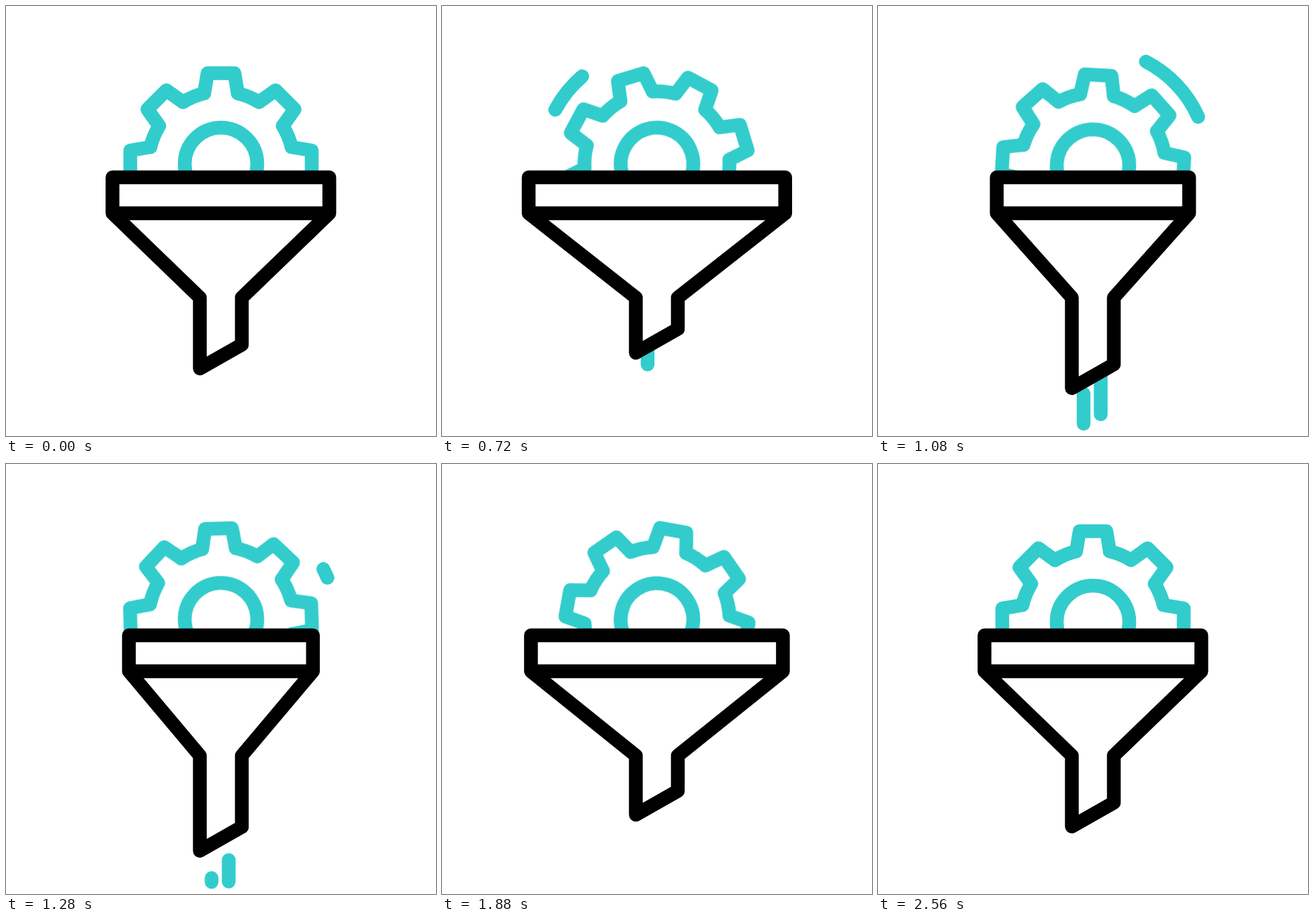
An HTML page without scripts that plays this animation: 640x640 px, repeating every 2840 ms.

```html
<!DOCTYPE html>
<html lang="en">
<head>
<meta charset="utf-8">
<title>Funnel and gear</title>
<style>
  @property --head { syntax: "<length>"; inherits: false; initial-value: 0px; }
  @property --tail { syntax: "<length>"; inherits: false; initial-value: 0px; }

  :root { --loop: 2840ms; --ease: cubic-bezier(.333, 0, .667, 1); }
  html, body { margin: 0; width: 100%; height: 100%; overflow: hidden; background: #fff; }
  svg { display: block; width: 100%; height: 100%; }

  .line {
    fill: none;
    stroke: #3cc;
    stroke-width: 20.5;
    stroke-linecap: round;
    stroke-linejoin: round;
  }
  .funnel { fill: #fff; stroke: #000; animation: squash var(--loop) var(--ease) infinite; }
  .bob { animation: bob var(--loop) var(--ease) infinite; }
  .spin { animation: spin var(--loop) var(--ease) infinite; }

  /* A stroke whose two ends travel along its path independently */
  .trail {
    stroke-dasharray: max(0px, var(--head) - var(--tail)) 300px;
    stroke-dashoffset: calc(var(--tail) * -1);
    opacity: 0;
    animation: head var(--loop) linear infinite, tail var(--loop) linear infinite;
  }
  .swoosh { animation-delay: 0ms, -50ms; }
  .drop-left { animation-delay: -40ms; }
  .drop-right { animation-delay: 120ms; }

  @keyframes squash {
    0%, 90.14%, 100% { d: path("M158.5 255H481.2V308.5H158.5ZM158.5 308.5L288.5 434V539.5L351 504V434L481.2 308.5"); }
    19.72% { d: path("M119.3 255H520.5V308.5H119.3ZM119.3 308.5L288.5 434V505.5L351 470V434L520.5 308.5"); }
    42.96% { d: path("M184.2 255H455.6V308.5H184.2ZM184.2 308.5L288.5 434V577L351 541.5V434L455.6 308.5"); }
    66.2% { d: path("M132.4 255H507.4V308.5H132.4ZM132.4 308.5L288.5 434V522L351 486.5V434L507.4 308.5"); }
  }
  @keyframes spin {
    0% { transform: rotate(0deg); }
    29.58% { transform: rotate(-17.8deg); animation-timing-function: cubic-bezier(.33, 0, .44, 1); }
    66.2% { transform: rotate(100.3deg); }
    90.14%, 100% { transform: rotate(90deg); }
  }
  @keyframes bob {
    0%, 29.58%, 84.5%, 100% { transform: translateY(0); }
    35.56% { transform: translateY(4px); }
    45.07% { transform: translateY(-4px); }
    56.34% { transform: translateY(4px); }
    66.2% { transform: translateY(-3.5px); }
  }
  @keyframes head {
    0%, 22.88% { --head: 0px; opacity: 0; }
    22.89% { --head: 0px; opacity: 1; animation-timing-function: var(--ease); }
    40.67%, 100% { --head: 100px; opacity: 1; }
  }
  @keyframes tail {
    0%, 31.69% { --tail: 0px; animation-timing-function: var(--ease); }
    51.76% { --tail: 100px; }
    51.77%, 100% { --tail: 200px; }
  }
</style>
</head>
<body>
<svg viewBox="0 0 640 640">
  <defs>
    <clipPath id="above"><path d="M0 0H640V250H0Z"/></clipPath>
    <path id="tooth" d="M-56.6 -91.9A108 108 0 0 1 -25 -105L-20 -135H20L25 -105"/>
    <g id="pair"><use href="#tooth"/><use href="#tooth" transform="rotate(45)"/></g>
  </defs>

  <g class="line">
    <path class="trail swoosh" pathLength="100" d="M168.6 154.5A171.5 171.5 0 0 1 478.4 169.4"/>
    <path class="trail drop-left" pathLength="100" d="M306 488V622"/>
    <path class="trail drop-right" pathLength="100" d="M331.5 490V621.5"/>

    <g clip-path="url(#above)">
      <g transform="translate(320 235)">
        <g class="bob">
          <g class="spin">
            <circle r="54"/>
            <use href="#pair"/>
            <use href="#pair" transform="rotate(90)"/>
            <use href="#pair" transform="rotate(180)"/>
            <use href="#pair" transform="rotate(270)"/>
          </g>
        </g>
      </g>
    </g>

    <path class="funnel" d="M158.5 255H481.2V308.5H158.5ZM158.5 308.5L288.5 434V539.5L351 504V434L481.2 308.5"/>
  </g>
</svg>
</body>
</html>
```
